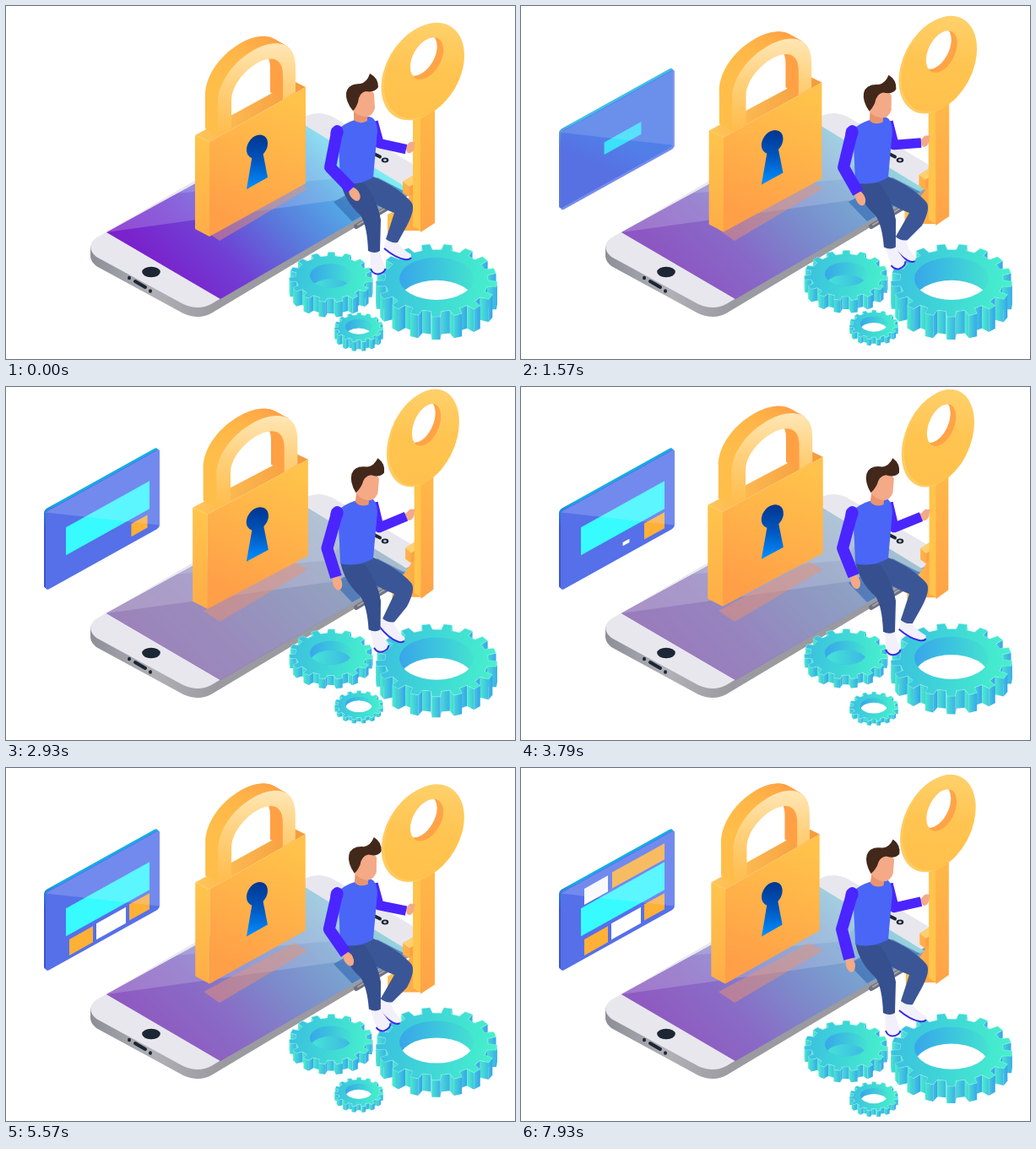
An HTML page with a canvas that plays this animation: 603 px wide and 418 px high, repeating every 8000 ms.

```html
<!DOCTYPE html>
<html lang="en">
<head>
<meta charset="utf-8">
<title>Phone security</title>
<style>
html, body { margin: 0; width: 603px; height: 418px; overflow: hidden; background: #fff; }
canvas { display: block; }
</style>
</head>
<body>
<canvas id="stage" width="603" height="418"></canvas>
<script>
const ctx = document.getElementById('stage').getContext('2d');
const LOOP = 8000;

const clamp = v => Math.max(0, Math.min(1, v));
const ease = v => (1 - Math.cos(Math.PI * clamp(v))) / 2;

// Eased swing from one [time, value] rest point to the next.
function glide(t, ...points) {
  return points.reduce((value, [time, target], i) => {
    if (!i) return target;
    const [from, start] = points[i - 1];
    return value + (target - start) * ease((t - from) / (time - from));
  }, 0);
}

function gradient(x0, y0, x1, y1, ...colors) {
  const g = ctx.createLinearGradient(x0, y0, x1, y1);
  colors.forEach((c, i) => g.addColorStop(i / (colors.length - 1), c));
  return g;
}

function shape(d, fill) {
  ctx.fillStyle = fill;
  ctx.fill(new Path2D(d));
}

function oval(x, y, rx, ry, fill, angle = 0) {
  ctx.beginPath();
  ctx.ellipse(x, y, rx, ry, angle, 0, 2 * Math.PI);
  ctx.fillStyle = fill;
  ctx.fill();
}

function line(d, width, color, cap = 'butt') {
  ctx.lineWidth = width;
  ctx.strokeStyle = color;
  ctx.lineCap = cap;
  ctx.lineJoin = 'round';
  ctx.stroke(new Path2D(d));
}

function group(draw) {
  ctx.save();
  draw();
  ctx.restore();
}

function spin(x, y, degrees) {
  ctx.translate(x, y);
  ctx.rotate(degrees * Math.PI / 180);
  ctx.translate(-x, -y);
}

function stretch(x, dy, factor) {
  ctx.translate(x, dy);
  ctx.scale(factor, 1);
  ctx.translate(-x, 0);
}

function extrude(d, dx, dy, fill) {
  const steps = Math.ceil(Math.hypot(dx, dy));
  const path = new Path2D(d);
  ctx.fillStyle = fill;
  for (let i = steps; i > 0; i--) group(() => {
    ctx.translate(dx * i / steps, dy * i / steps);
    ctx.fill(path);
  });
}

function drawPhone(t) {
  const body = 'M106 275 L356 130 Q372 123 390 133 L480 186 Q497 198 484 209 ' +
    'L243 353 Q228 361 210 353 L107 297 Q94 286 106 275Z';
  extrude(body, 0, 11, gradient(100, 0, 250, 0, '#8d8e96', '#b0b0b6', '#9a9aa0'));
  shape(body, '#e8e7ee');

  const screen = 'M119 268 L254 347 L478 217 L352 140Z';
  shape(screen, gradient(205, 335, 405, 145, '#7a22cc', '#7040d4', '#5a78dc', '#53a8e6', '#63f5f3'));
  const fade = glide(t, [0, 0], [3000, .78], [5600, .46]);
  shape(screen, `rgba(166,160,182,${fade})`);
  shape('M119 268 L440 223 L478 217 L352 140Z', 'rgba(225,228,240,.22)');
  shape('M200 222 L385 205 L405 172 L352 140Z', 'rgba(235,245,245,.16)');
  shape('M388 232 L410 255 L473 220 L440 203Z', 'rgba(55,105,180,.65)');

  const dark = '#1c2634';
  oval(172, 315, 10.8, 6.2, dark);
  line('M153 326 L165 333', 4, dark, 'round');
  oval(146, 322, 2, 2.3, dark);
  oval(171, 337.5, 2, 2.3, dark);
  line('M415 261 L452 239', 6, '#6f7280', 'round');
  line('M417 259 L450 239', 2, '#a4a6b0', 'round');
  line('M436 175 L443 178.5', 4, dark, 'round');
  oval(449, 182.5, 4.3, 3, dark);
  oval(449, 182.5, 1.8, 1.2, '#d8d8e4');
  shape('M234 265 L253 278 L358 216 L341 207Z', 'rgba(238,145,110,.48)');
}

function drawLock(t) {
  const rise = 17.5 * clamp(t / 5000);
  stretch(289.5, -rise, glide(t, [0, 1], [3300, 1.045], [6700, .98]));

  shape('M224 153 L241 161 L355 96 L341 89Z', gradient(224, 0, 355, 0, '#ffc65a', '#f59a3c'));
  const shackle = 'M251 154 L251 115 C251 60 343 12 343 72 L343 102 L328 111 ' +
    'L328 82 C328 38 267 78 267 112 L267 145Z';
  extrude(shackle, -15, -8.5, gradient(236, 0, 328, 0, '#ffc24a', '#ffb648', '#ffa045'));
  shape(shackle, gradient(0, 45, 0, 150, '#ffe6b4', '#ffcf78', '#ffbd4e'));

  shape('M224 153 L241 161 V273 L224 264Z', gradient(0, 153, 0, 273, '#ffc54c', '#ffad47'));
  shape('M241 161 L355 96 V210 L241 273Z', gradient(330, 110, 270, 255, '#ffc24a', '#ffb149', '#ff9f48'));
  const blue = gradient(300, 152, 295, 215, '#00358f', '#0056be', '#008cff');
  oval(297.5, 166.5, 11.2, 15, blue, .6);
  shape('M292 176 L285 217 L310 203 L304 172Z', blue);
}

function drawCard(t) {
  const shown = clamp((t - 250) / 1650);
  ctx.globalAlpha = shown;
  ctx.transform(1, -.555, 0, 1, 46, 148 + 15 * (1 - ease(shown)));
  const panel = (x, y, fill) => {
    ctx.beginPath();
    ctx.roundRect(x, y, 135, 94, 4);
    ctx.fillStyle = fill;
    ctx.fill();
  };
  panel(-1, -3, gradient(0, 20, 20, 0, '#3a55c8', '#12aee6'));
  panel(1, 0, '#5570e8');

  // Tiles open from their middles, one after another: left, right, top, bottom.
  const orange = '#ffb036', white = '#fff';
  const tiles = [
    [25, 124, 32, 65, '#37fbff'],
    [100, 124, 69, 88, orange],
    [61, 96, 70, 89, white],
    [29, 57, 71, 90, orange],
    [62, 124, 10, 29, orange],
    [29, 57, 11, 30, white]
  ];
  tiles.forEach(([left, right, top, bottom, color], i) => {
    const size = ease((t - 1200 - 1170 * i) / 800);
    const w = (right - left) * size, h = (bottom - top) * size;
    ctx.fillStyle = color;
    ctx.fillRect((left + right - w) / 2, (top + bottom - h) / 2, w, h);
  });
  shape('M1 1 H131 Q136 0 136 4 V91Z', 'rgba(220,225,255,.22)');
}

const keyHeight = t => glide(t, [0, 18], [3400, 0], [5800, 18], [9300, 0]);

function drawKey(t) {
  const y = keyHeight(t);
  stretch(495, y - 18, .867 + .133 * y / 18);
  shape('M470 208 L482 201 L491 207 V266 L470 266 L459 272 L452 268 V247 L468 239 L478 226 L470 221Z',
    gradient(452, 0, 491, 0, '#ffc04a', '#ffa347'));
  shape('M470 208 L482 201 L490 207 L478 214Z', '#ffd070');
  shape('M478 214 L490 207 V218 L478 225Z', '#ffa043');
  shape('M482 120 H493 V267 L482 261Z', '#ffc44b');
  shape('M491 120 L508 114 V257 L491 268Z', gradient(0, 120, 0, 268, '#ffb848', '#ffa347'));

  const tilt = Math.PI / 6;
  oval(492, 78.5, 42, 61, '#ffcb62', tilt);
  oval(495.5, 76.5, 42, 61, gradient(500, 20, 490, 135, '#ffd06a', '#ffc450', '#ffc14b'), tilt);
  oval(498.5, 62, 16.5, 27, '#ffa347', tilt);
  ctx.clip();
  oval(491, 58, 16.5, 27, '#fff', tilt);
}

const mix = (a, b, k) => `rgb(${a.map((v, i) => Math.round(v + (b[i] - v) * clamp(k)))})`;
const BLUE = [54, 160, 237], TEAL = [76, 240, 204];

function drawGear(cx, cy, radius, teeth, depth, hole, floor) {
  const SQUASH = .6, ROOT = .85;
  const ring = [];
  for (let i = 0; i < teeth; i++) {
    for (const [part, r] of [[0, ROOT], [.08, 1], [.46, 1], [.54, ROOT]]) {
      const a = (i + part) / teeth * 2 * Math.PI;
      ring.push([cx + radius * r * Math.cos(a), cy + radius * r * SQUASH * Math.sin(a)]);
    }
  }
  ring.map((p, i) => [p, ring[(i + 1) % ring.length]])
    .filter(([p, q]) => q[0] < p[0] + .3)
    .sort(([a, b], [c, d]) => a[1] + b[1] - c[1] - d[1])
    .forEach(([p, q]) => {
      const facing = (q[1] - p[1]) / Math.hypot(q[0] - p[0], q[1] - p[1]);
      const k = .5 - .5 * facing;
      shape(`M${p} L${q} v${depth} L${p[0]} ${p[1] + depth}Z`,
        gradient(q[0], 0, p[0] + .1, 0, mix(BLUE, TEAL, k + .3), mix(BLUE, TEAL, k - .3)));
    });
  const outline = 'M' + ring.join('L') + 'Z';
  shape(outline, gradient(cx - radius, cy - radius * .2, cx + radius, cy, '#3bbfe0', '#3fd8d6', '#47f1cb'));
  line(outline, .8, 'rgba(170,255,240,.5)');
  group(() => {
    const ry = hole * .57, top = cy - radius * .03;
    oval(cx, top, hole, ry, gradient(cx - hole, cy, cx + hole, cy, '#38a6ea', '#3cc4de', '#44e2d0'));
    ctx.clip();
    oval(cx, top + depth, hole, ry, floor);
  });
}

function drawGears(t) {
  drawGear(510, 325 + glide(t, [1700, 0], [3800, -2], [8300, 9]), 72, 17,
    glide(t, [1700, 27], [4600, 20]), 44, '#fff');
  drawGear(385, 321 + glide(t, [0, 0], [3500, -5], [8300, 8]), 49.5, 15,
    glide(t, [0, 18], [3500, 11], [8000, 14]), 25, gradient(362, 0, 408, 0, '#45e4d6', '#3db8e4'));
  drawGear(418, 380.5 + glide(t, [0, 0], [2300, -4], [8300, 8.5]), 29, 15,
    glide(t, [0, 11], [3000, 4.5], [5000, 7]), 16, '#fff');
}

const SKIN = '#f4a987', SLEEVE = '#4a25ff', SOLE = '#3b2be0', SHOE = '#f1f0fb';

function drawLegs(t) {
  const swing = ease(1 - Math.abs(t % 4000 / 2000 - 1));
  const lx = swing, ly = 290 - 5 * swing;
  const rx = -7 * swing, ry = -3 * swing;

  group(() => {
    ctx.translate(rx, ry);
    spin(455, 278, 20 * swing);
    shape('M450 277 L463 279 Q470 289 480 294 Q481 301 472 300 Q460 298 448 288Z', SHOE);
    line('M448 287 Q461 298 472 300 Q478 301 480 298', 2, SOLE);
  });
  shape(`M410 210 L435 202 Q464 214 480 232 Q486 239 475 260 L${464 + rx} ${280 + ry}
    Q${456 + rx} ${281 + ry} ${450 + rx} ${276 + ry} L460 245 Q430 234 410 210Z`, '#3b5697');

  group(() => {
    ctx.translate(lx, ly - 290);
    spin(437, 291, -18 * swing);
    shape('M431 288 L443 288 Q444 300 450 310 Q448 319 439 318 Q432 316 432 310Z', SHOE);
    line('M432 311 Q434 317 440 317.5 Q448 317 449.5 311', 2, SOLE);
  });
  shape(`M396 206 Q400 230 420 248 Q428 260 ${429 + lx} ${ly} Q${437 + lx} ${ly + 4} ${443 + lx} ${ly}
    L444 253 Q440 230 425 210Z`, '#364f8e');
}

function drawHead(t) {
  const tilt = glide(t, [0, 0], [3300, 8.5], [6300, 3.5], [8300, 9]);
  ctx.translate(tilt * .2, tilt * .25);
  spin(420, 135, tilt);
  shape('M412 118 L428 120 L428 136 Q419 141 412 135Z', '#e8956f');
  shape('M411 110 L423 99 Q434 99 436 104 L437 121 Q434 132 425 131 Q416 130 411 124Z', SKIN);
  shape('M411 124 Q402 113 403 103 Q405 92 420 92 Q428 90 431 80 Q441 85 441 96 ' +
    'Q437 103 426 101 Q418 103 417 114 Q414 122 411 124Z', '#42281a');
}

function drawMan(t) {
  drawLegs(t);

  const wrist = 152.5 + keyHeight(t) * .95;
  const elbow = 167 - (wrist - 152) * .25;
  oval(479, wrist - 2, 4.5, 7, SKIN, .35);
  line(`M470 ${wrist} L483 ${wrist - 7}`, 3.5, SKIN, 'round');
  line(`M435 137 L442 ${elbow} L474 ${wrist}`, 11.5, SLEEVE);

  shape('M393 147 Q400 139 413 135 L430 131 Q439 132 440 148 L435 203 Q416 214 396 209 L395 184Z', '#4a66f6');
  group(() => drawHead(t));

  const reach = glide(t, [0, 18], [3000, 0], [5300, 12], [8000, -2]);
  const handX = 391 + reach, handY = 225 - reach * .45, elbowX = 380.4 + reach * .2;
  const angle = Math.atan2(handY - 180, handX - elbowX);
  oval(handX + 7 * Math.cos(angle), handY + 7 * Math.sin(angle), 9, 5.5, SKIN, angle);
  line(`M392 150 L${elbowX} 191 L${handX} ${handY}`, 14, SLEEVE);
  oval(392, 150, 7.5, 9, SLEEVE, .3);
}

function render(now) {
  const t = now % LOOP;
  ctx.clearRect(0, 0, 603, 418);
  for (const draw of [drawPhone, drawLock, drawCard, drawKey, drawGears, drawMan]) group(() => draw(t));
}

const start = performance.now();
function frame() {
  render(performance.now() - start);
  requestAnimationFrame(frame);
}
frame();
</script>
</body>
</html>
```
